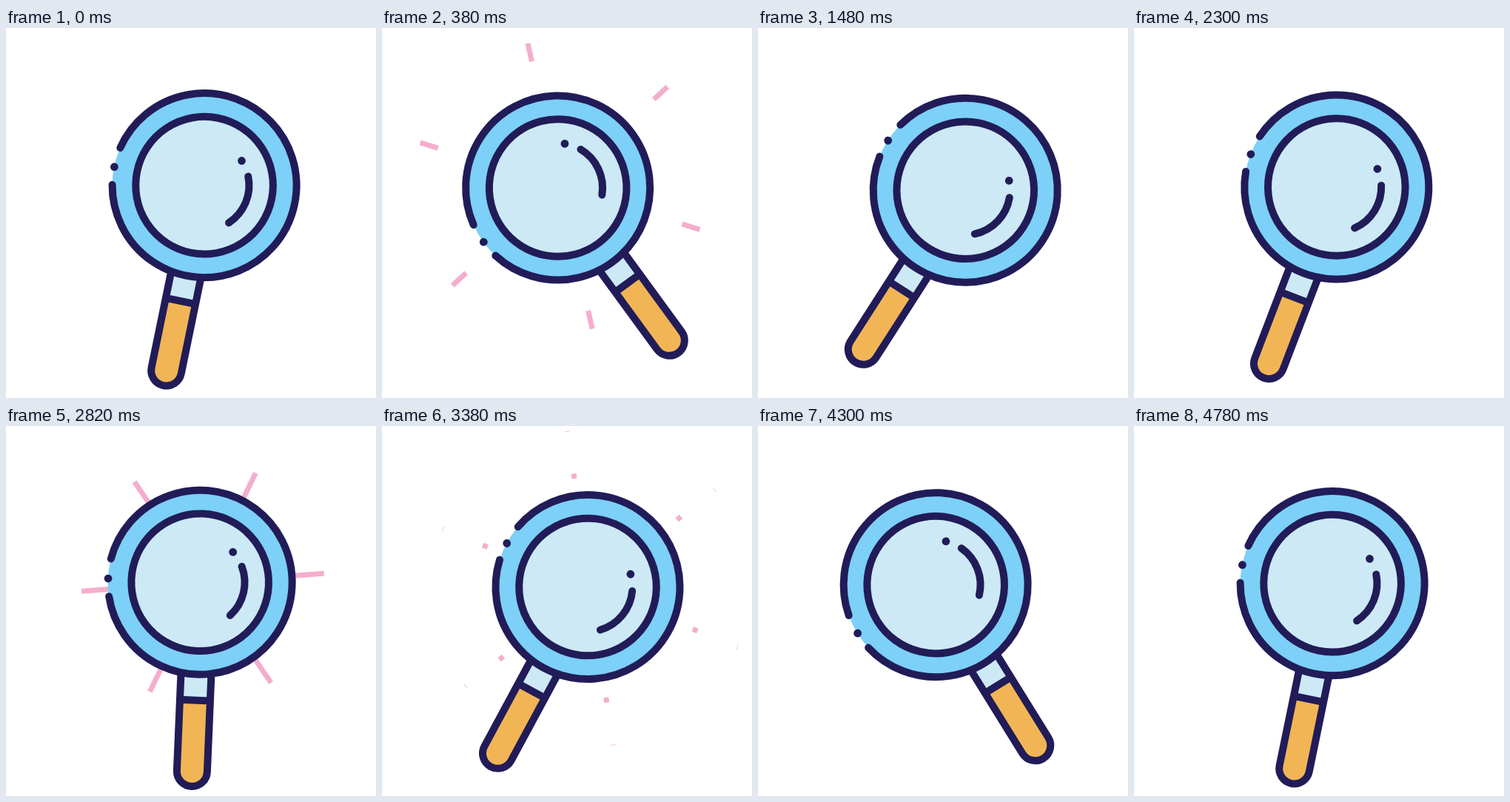
An HTML page that plays this animation: 500 by 500 pixels, repeating every 4.8 s.

```html
<!DOCTYPE html>
<html lang="en">
<head>
<meta charset="utf-8">
<title>Magnifying glass</title>
<style>
  html, body { margin: 0; height: 100%; overflow: hidden; background: #fff; }
  svg { display: block; width: 100vw; height: 100vh; }
  .line { stroke: #211c58; stroke-width: 10; stroke-linecap: round; stroke-linejoin: round; }
  .dot { fill: #211c58; }
  .pale { fill: #cce9f5; }
</style>
</head>
<body>
<svg viewBox="0 0 500 500">
  <g id="glass">
    <path id="rays" transform="translate(3.7 -.2)" stroke="#f4aecd" stroke-width="7" fill="none"/>
    <path class="pale" d="M-20.5 110H20.5V160H-20.5Z"/>
    <path fill="#f2b555" d="M-20.5 160H20.5V255.5A20.5 20.5 0 0 1-20.5 255.5Z"/>
    <path class="line" fill="none" d="M-20.5 115V255.5A20.5 20.5 0 0 0 20.5 255.5V115M-20.5 159.5H20.5"/>
    <circle r="124.5" fill="#7dd0f7"/>
    <path class="line" id="rim" fill="none"/>
    <circle class="line pale" r="92.8"/>
    <path class="line" id="shine" fill="none"/>
    <circle class="dot" cx="-124.2" r="5.4"/>
    <circle class="dot" cx="42.7" cy="-42.7" r="5.4"/>
  </g>
</svg>
<script>
const LOOP = 4800;
const STEP = 20;
const REST = 11.6;
// Each swing: start, duration, target angle, ease-out power
const swings = [
  [0, 650, -37.6, 4],
  [1085, 803, 37.7, 4],
  [2281, 300, -35, 4],
  [2581, 1220, 29.3, 4],
  [3925, 370, -31.8, 4],
  [4302, 480, REST, 5],
];
const bursts = [0, 2570];
const BURST_LIFE = 830;

const el = id => document.getElementById(id);
const polar = (r, deg) => {
  const a = deg * Math.PI / 180;
  return `${(r * Math.cos(a)).toFixed(2)} ${(r * Math.sin(a)).toFixed(2)}`;
};
const arc = (r, from, to) =>
  `M${polar(r, from)}A${r} ${r} 0 ${to - from > 180 ? 1 : 0} 1 ${polar(r, to)}`;

function angleAt(t) {
  let angle = REST;
  for (const [start, duration, target, power] of swings) {
    if (t < start) break;
    const left = Math.max(0, 1 - (t - start) / duration);
    angle = target + (angle - target) * left ** power;
  }
  return angle;
}

const approach = (reach, t) => t > 0 ? reach * (1 - Math.exp(-t / 120)) : 0;

// Six streaks whose tails chase their heads out to the given radius
function streaks(reach, t) {
  if (t < 0 || t > BURST_LIFE) return "";
  const head = approach(reach, t - 77);
  const tail = approach(reach, t - 185);
  let d = "";
  for (let k = 0; k < 6; k++) {
    const deg = 60 * k - 6.6;
    d += `M${polar(tail, deg)}L${polar(head, deg)}`;
  }
  return d;
}

function draw() {
  // The motion advances in whole steps, 50 per second
  const t = Math.round(performance.now() / STEP) * STEP % LOOP;
  el("glass").setAttribute("transform",
    `translate(256.6 248.7) rotate(${angleAt(t)}) translate(4 -37.6)`);
  el("rays").setAttribute("d",
    bursts.map(b => streaks(215, t - b) + streaks(161, t - b - 310)).join(""));
  requestAnimationFrame(draw);
}

el("rim").setAttribute("d", arc(124.5, 192.4, 528.8));
el("shine").setAttribute("d", arc(60.4, -23.2, 45.3));
draw();
</script>
</body>
</html>
```
